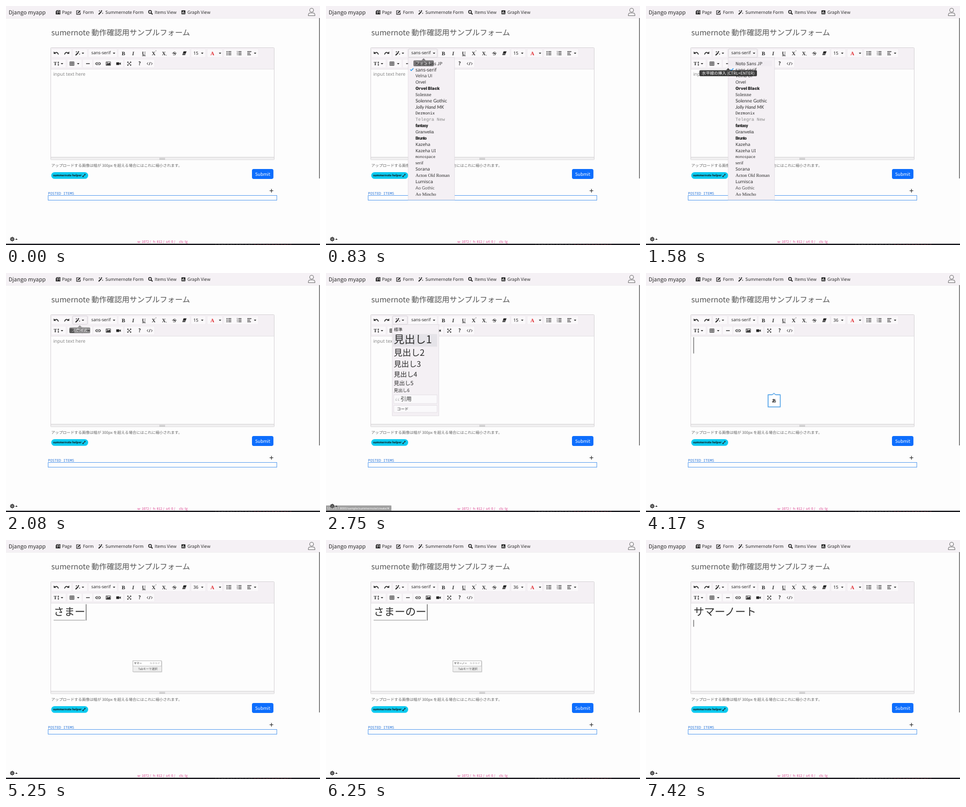
Animation, 600 px wide and 456 px high, one loop 8000 ms. Source, as an HTML page:

```html
<!DOCTYPE html>
<html lang="ja">
<head>
<meta charset="utf-8">
<title>Editor form</title>
<style>
html, body { margin: 0; width: 100%; height: 100%; overflow: hidden; background: #fdfdfd; }
svg { display: block; width: 600px; height: 456px; }
text { font-family: "Noto Sans CJK JP", "Noto Sans CJK", sans-serif; fill: #2b2b2b; white-space: pre; text-rendering: geometricPrecision; }
.ui { font-family: "Noto Sans", sans-serif; }
.i { fill: none; stroke: #222; stroke-width: 1.2; }
</style>
</head>
<body>
<svg viewBox="0 0 600 456"><g id="page"></g><g id="live"></g></svg>
<script>
const LOOP = 8000, EM = 20.15;
const SANS = '"Liberation Sans", sans-serif', SERIF = '"Liberation Serif", serif';
const MONO = '"Noto Sans Mono", monospace', UI = '"Noto Sans", sans-serif';

// Text is placed by its left edge and the middle of its capitals.
const text = (x, cy, size, str, css = '', cls = '') =>
  `<text x="${x}" y="${cy + size * .36}" font-size="${size}" class="${cls}" style='${css}'>${str}</text>`;
const rect = (x, y, w, h, fill, attrs = '') =>
  `<rect x="${x}" y="${y}" width="${w}" height="${h}" fill="${fill}" ${attrs}/>`;
const line = (d, attrs = '') => `<path class="i" d="${d}" ${attrs}/>`;
const fill = (d, color = '#222') => `<path d="${d}" fill="${color}"/>`;
const icon = (x, y, body) => `<g transform="translate(${x} ${y})">${body}</g>`;
const fade = (alpha, body) => alpha ? `<g opacity="${alpha}">${body}</g>` : '';
const drop = (x, y) => fill(`M${x - 2.3} ${y - 1}h4.6l-2.3 2.6z`);

const wand = line('M-4 4L1 -1', 'style="stroke-width:2"') +
  fill('M1.5 -4.6l.6 1.3 1.3 .6-1.3 .6-.6 1.3-.6-1.3-1.3-.6 1.3-.6zM-2.5 -4l.5 1 1 .5-1 .5-.5 1-.5-1-1-.5 1-.5zM3.6 .4l.4 1 1 .4-1 .4-.4 1-.4-1-1-.4 1-.4z');
const rows = [-3, 0, 3];
const bars = widths => rows.map((y, i) => line(`M-4 ${y}h${widths[i]}`)).join('');
const listIcon = mark => rows.map((y, i) => mark(y, i) + line(`M-1.5 ${y}h6`)).join('');
const undo = line('M-2.5 -.5Q2 -3.5 4.2 2.5', 'style="stroke-width:1.5"') + fill('M-4.8 1.2v-4.4l4.4 4.4z');

function navBar() {
  const links = [['Page', 107], ['Form', 147], ['Summernote Form', 189.7], ['Items View', 284], ['Graph View', 346.7]];
  return rect(0, 0, 600, 23, '#f5f1f5') + rect(0, 23, 600, .6, '#e6e2e6') +
    text(5, 12, 10.5, 'Django myapp') +
    links.map(([s, x]) => text(x, 12, 8.35, s)).join('') +
    icon(99.5, 12, line('M-2.5 -3.3h6.3v6.6h-7.6v-5h1.3zM-2.5 -2v5M-1 1h3.6M-1 2.2h3.6') + rect(-1, -2, 3.6, 1.8, '#222')) +
    icon(138.5, 12, line('M1 -3h-4.5v6.8h6.8v-3.6') + line('M-1.2 1.6L3.4 -3', 'style="stroke-width:1.9"')) +
    icon(181, 12, wand) +
    icon(276, 12, '<circle class="i" cx="-.8" cy="-.8" r="2.7" style="stroke-width:1.5"/>' + line('M1.2 1.2L4 4', 'style="stroke-width:1.8"')) +
    icon(339, 12, rect(-3.8, -3.8, 7.6, 7.6, '#222', 'rx="1"') +
      line('M-2 2.3v-2.8M0 2.3v-4.6M2 2.3v-1.5', 'style="stroke:#fff"')) +
    icon(584, 11, '<g fill="none" stroke="#777" stroke-width="1.1"><circle cy="-3" r="3.7"/><path d="M-6.2 7.5v-1.5q0-3.8 3.8-3.8h4.8q3.8 0 3.8 3.8v1.5z"/></g>');
}

function toolbar() {
  const groups = [[86.5, 39], [127.5, 28], [157.5, 55], [214.5, 137], [353.5, 28], [384.5, 29], [416, 66.5]];
  const lower = [[86.5, 28], [117, 28], [146.5, 19], [166.5, 58], [226, 58]];
  const box = y => ([x, w]) => rect(x, y, w, 16, '#faf8fa', 'rx="1.5" stroke="#ece8ed" stroke-width=".6"');
  const glyph = (x, s, css) => text(x, 90, 10, s, `font-family:${SERIF};font-weight:700;${css || ''}`);
  return groups.map(box(82)).join('') + lower.map(box(101.7)).join('') +
    icon(96, 90, undo) + icon(116, 90, `<g transform="scale(-1 1)">${undo}</g>`) +
    icon(137, 90, wand) + drop(147, 90) +
    text(163, 89.5, 8.2, 'sans-serif', '', 'ui') + drop(206.5, 90) +
    glyph(221, 'B') + glyph(241, 'I', 'font-style:italic') + glyph(259.7, 'U') + rect(260, 94.5, 7, .9, '#222') +
    glyph(278.5, 'X') + text(285.8, 87, 5, "'", 'font-weight:700') +
    glyph(298, 'X') + text(305.4, 92.5, 5, ',', 'font-weight:700') +
    glyph(319, 'S') + rect(317.5, 89.6, 8.5, .9, '#222') +
    icon(341, 90, fill('M-1.6 -3.5h5.6l-2.6 7h-5.6z') + line('M-3 1.2h5', 'style="stroke:#faf8fa;stroke-width:.7"')) +
    drop(375, 90) +
    glyph(390.8, 'A', 'fill:#e0262c') + drop(409, 90) +
    icon(426, 90, listIcon(y => rect(-4.5, y - .8, 1.7, 1.7, '#222'))) +
    icon(445.5, 90, listIcon((y, i) => text(-4.5, y, 3.2, i + 1, 'font-weight:700'))) +
    icon(465, 90, bars([8, 5.5, 7])) + drop(476, 90) +
    text(91, 109.7, 9.5, 'T', `font-family:${SERIF};font-weight:700`) +
    icon(100, 110, line('M0 -3v6', 'style="stroke-width:.9"') + fill('M-1.5 -2l1.5 -2 1.5 2zM-1.5 2l1.5 2 1.5 -2z')) + drop(107, 110) +
    icon(126, 110, line('M-4 -3.5h8v7h-8zM-4 -1.2h8M-4 1.1h8M-1.3 -3.5v7M1.4 -3.5v7', 'style="stroke-width:.8"')) + drop(138, 110) +
    rect(153, 109.3, 7, 1.3, '#222') +
    icon(176, 110, line('M-.5 -2h-2a2 2 0 0 0 0 4h2M.5 -2h2a2 2 0 0 1 0 4h-2M-2 0h4')) +
    icon(195.5, 110, line('M-4.3 -3.3h8.6v6.6h-8.6z', 'style="stroke-width:.9"') + fill('M-3.4 2.5v-1.5l2 -2 1.2 1.2 2 -2.3 1.8 2v2.6z') + '<circle cx="-2" cy="-1.6" r=".8"/>') +
    icon(215, 110, rect(-4.3, -2.5, 5.8, 5, '#222', 'rx=".6"') + fill('M1.3 0l3 -2.4v4.8z')) +
    icon(235.5, 110, line('M-3 -3L3 3M3 -3L-3 3', 'style="stroke-width:1"') + fill('M-3.7 -3.7h2.7l-2.7 2.7zM3.7 -3.7v2.7l-2.7 -2.7zM-3.7 3.7v-2.7l2.7 2.7zM3.7 3.7h-2.7l2.7 -2.7z')) +
    text(252.7, 110, 9.5, '?', 'font-weight:700') +
    icon(274.5, 110, line('M-2.8 -2.2l-2.3 2.2 2.3 2.2M2.8 -2.2l2.3 2.2 -2.3 2.2M1 -3l-2 6', 'style="stroke-width:1"'));
}

function page() {
  const specks = Array.from({ length: 26 }, (_, i) =>
    rect(400 + i * 5.7, 454.2 + i % 3 * .4, 2 + i * 7 % 3, .6, i > 12 ? '#7c2f3c' : '#555')).join('');
  const teeth = Array.from({ length: 8 }, (_, i) =>
    `<path d="M-.8 -2.6h1.6v-1.6h-1.6z" transform="rotate(${i * 45})"/>`).join('');
  return rect(0, 0, 600, 456, '#fdfdfd') + navBar() +
    rect(598, 23, 2, 306, '#8d8d8d') +
    text(86.5, 51, 14.56, 'sumernote 動作確認用サンプルフォーム', 'font-weight:300;fill:#555') +
    rect(85.5, 79.5, 427, 214, '#fdfdfd', 'stroke="#d6d3d6" rx="1"') +
    rect(86, 80, 426, 40, '#f4f0f4') + rect(86, 120, 426, .7, '#dcd9dc') +
    rect(86, 288.5, 426, 5, '#f0eff0') + rect(86, 288, 426, .8, '#cfcccf') +
    rect(293, 290, 11, .8, '#aaa') + rect(293, 292, 11, .8, '#aaa') +
    toolbar() +
    text(86.5, 304.5, 7.33, 'アップロードする画像は幅が 300px を超える場合にはこれに縮小されます。', 'fill:#666') +
    rect(86.5, 317, 70.5, 12.8, '#0dcaf0', 'rx="6.4"') +
    text(90, 323.2, 5.6, 'summernote helper', 'font-weight:700;fill:#111') +
    icon(149, 323.3, line('M-2 2L2 -2') + fill('M.2 -2.9h2.7v2.7zM-.2 2.9h-2.7v-2.7z')) +
    rect(470, 311, 41, 19, '#0d6efd', 'rx="3.4"') + text(476, 320.7, 8.5, 'Submit', 'fill:#fff') +
    line('M503.7 352.5h7M507.2 349v7', 'style="stroke-width:1.1"') +
    text(80.3, 357.6, 6.95, 'POSTED ITEMS', 'font-family:"Noto Sans Mono",monospace;fill:#2874d8') +
    rect(80.5, 361.5, 437, 9, '#fdfdfd', 'stroke="#5c9ff0" stroke-width="1"') +
    icon(12, 444.8, teeth + '<circle class="i" r="2.5"/><circle r="1"/>') +
    fill('M17.6 446l2.3 -2.4 2.3 2.4z') +
    [['w: 1072 /', 251], ['h: 812 /', 281], ['srl: 0 /', 305.5], ['cls: lg', 330.5]]
      .map(([s, x]) => text(x, 449.3, 6.3, s, 'fill:#d63384')).join('') +
    rect(0, 453.6, 600, 2.4, '#15151a') + specks;
}

const fonts = [
  ['Noto Sans JP', 8.4], ['sans-serif', 8.9, UI], ['Velna UI', 8.4, '"Open Sans", sans-serif'],
  ['Orvel', 8.3, SANS], ['Orvel Black', 8.1, 'Inter, sans-serif', 900],
  ['Solenne', 8, '"Noto Serif", serif'], ['Solenne Gothic', 9, 'Lato, sans-serif'],
  ['Jolly Hand MK', 9, 'Lato, sans-serif;font-style:italic'], ['Dermonix', 7.7, MONO],
  ['Telegra New', 8.5, '"Liberation Mono", monospace;fill:#888'],
  ['fantasy', 8.4, 'Roboto, sans-serif;letter-spacing:-.7px', 900], ['Granvelia', 8.2, SANS],
  ['Brunto', 8.4, 'Roboto, sans-serif;letter-spacing:-.8px', 900], ['Kazeha', 8.3, UI], ['Kazeha UI', 8.2, UI],
  ['monospace', 7.05, MONO], ['serif', 8.5, SERIF], ['Sorana', 8.4, UI], ['Acton Old Roman', 8.9, SERIF],
  ['Lumisca', 8.2, '"DejaVu Sans", sans-serif'], ['Ao Gothic', 8.3, 'Lato, sans-serif;fill:#555'],
  ['Ao Mincho', 8.6, SERIF]
];
const fontMenu = lit => rect(157, 98.5, 88.7, 271.5, '#f4f0f4', 'stroke="#dcd8dd" stroke-width=".7"') +
  (lit ? rect(158, 104, 83, 11, '#f0ecf1') : '') +
  fonts.map(([s, size, family = '"Noto Sans CJK JP", sans-serif', weight = 400], i) =>
    text(171, 109.6 + 11.86 * i, size, s, `font-weight:${weight};font-family:${family}`)).join('') +
  line('M161 121.3l2 2 4 -4.2', 'style="stroke:#1e96f0;stroke-width:1.4"');

const heads = [[127, 20.5], [152.5, 16.6], [174, 14.6], [193, 12.6], [210, 10.6], [224, 8.5]];
const styleMenu = lit => rect(126.7, 98.5, 89, 173.8, '#f4f0f4', 'stroke="#dcd8dd" stroke-width=".7"') +
  (lit ? rect(128, 116.5, 84.5, 24, '#e5e3e8') : rect(128, 102.5, 84.5, 11, '#e5e3e8')) +
  text(129.7, 108, 8.2, '標準') +
  heads.map(([y, size], i) => text(129.5, y, size, '見出し' + (i + 1))).join('') +
  rect(129.7, 232.5, 82.5, 16.5, '#faf9fb', 'stroke="#dedbe0" stroke-width=".7"') +
  text(131.5, 245, 22, '“', `font-family:${SERIF};fill:#ccc`) + text(142.5, 240.5, 10.6, '引用') +
  rect(129.7, 252.5, 82.5, 13.5, '#faf9fb', 'stroke="#dedbe0" stroke-width=".7"') + text(135.5, 259.3, 7.4, 'コード');

const tip = (cx, y, w, size, str) => fill(`M${cx - 4} ${y}l4 -4 4 4z`, '#2b2b2b') +
  rect(cx - w / 2, y, w, 11.3, '#2b2b2b', 'rx="2"') +
  `<text x="${cx}" y="${y + 5.5 + size * .36}" font-size="${size}" text-anchor="middle" style="fill:#fff">${str}</text>`;

const badgeShape = (color, width) =>
  `<path d="M233.5 232.5h8l3 -2.6 3 2.6h8.8v22.8h-22.8z" fill="#fff" stroke="${color}" stroke-width="${width}"/>`;
const modeBadge = badgeShape('#9ccbf5', 2.4) + badgeShape('#2f8fe0', 1) +
  text(240.3, 244, 8.6, 'あ', 'font-weight:700');

function candidates(words) {
  const longest = Math.max(...words.map(w => w.length));
  const w = words.length > 1 ? 63 : longest > 5 ? 61 : 55, h = words.length * 10.4;
  return rect(243.5, 231.5, w, h + 10.6, '#bbb', 'opacity=".5"') +
    rect(242.3, 230.3, w - .3, h + 10.4, '#fff', 'stroke="#999" stroke-width=".7"') +
    rect(242.7, 230.3 + h, w - 1, 10, '#eee') + rect(242.3, 230 + h, w, .6, '#aaa') +
    words.map((s, i) => text(244.5, 235.5 + 10.4 * i, 5.1, s, 'fill:#111')).join('') +
    (words.length > 1 ? '' : text(w + 219.5, 235.5, 5, 'カタカナ', 'fill:#999')) +
    text(w / 2 + 225, 235.6 + h, 5.6, 'Tabキーで選択', 'fill:#555');
}

// Each track is a list of [start, value] holds.
const tracks = {
  fontTip: [[0, 0], [420, .3], [500, .6], [580, .8], [670, .9], [830, .6], [920, .3], [1000, 0]],
  ruleTip: [[0, 0], [1250, .2], [1330, .5], [1420, .75], [1500, .9], [1750, .6], [1830, .3], [1920, 0]],
  styleTip: [[0, 0], [2080, .5], [2170, .9], [2500, .5], [2580, .2], [2670, 0]],
  menu: [[0, ''], [830, 'font'], [2080, ''], [2500, 'style'], [2830, '']],
  lit: [[0, 0], [1170, 1], [1920, 0], [2670, 1]],
  hover: [[0, 0], [420, 157.5], [2080, 127.5], [2830, 0]],
  status: [[0, 0], [2670, .3], [2750, .55], [2830, .3], [2920, 0]],
  size: [[0, 15], [2830, 36], [7420, 15]],
  caret: [[0, 0], [2830, 1], [3330, 0], [3830, 1], [7420, 2]],
  badge: [[0, 0], [3830, .2], [3920, .4], [4000, .65], [4080, .85], [4170, 1], [4330, 0]],
  typed: [[0, ''], [4330, 'ｓ'], [4500, 'さｍ'], [4830, 'さま'], [5250, 'さまー'], [5750, 'さまーｎ'], [5920, 'さまーの'],
    [6250, 'さまーのー'], [6420, 'さまーのーｔ'], [6500, 'さまーのーと'], [6590, 'サマーノート']],
  words: [[0, ''], [4330, 'ｓ'], [4500, 'サｍ'], [4830, 'サマ'], [5250, 'サマー'], [5330, 'サマー,サマータイム,サマーセール'],
    [5750, 'サマーｎ'], [5920, 'サマーノ'], [6250, 'サマーノー'], [6420, 'サマーノーｔ'], [6500, 'サマーノート'], [6670, '']],
  underline: [[0, 0], [4330, 1], [6830, 0]]
};
const at = (track, t) => track.filter(([start]) => start <= t).pop()[1];

function scene(t) {
  const s = {};
  for (const key in tracks) s[key] = at(tracks[key], t);
  const end = 91 + EM * s.typed.length;
  const hoverWidth = s.hover > 150 ? 55 : 28;
  return (s.hover ? rect(s.hover, 82, hoverWidth, 16, '#201028', 'fill-opacity=".02" stroke="#cfcad0" stroke-width=".7" rx="1.5"') : '') +
    text(358, 89.5, 8.5, s.size, '', 'ui') +
    (t < 2830 ? text(90.3, 129.3, 8.9, 'input text here', 'fill:#888', 'ui') : '') +
    (s.typed ? text(91, 137.2, EM, s.typed) : '') +
    (s.underline ? rect(91, 152.6, end - 91, .8, '#777') : '') +
    (s.caret === 1 ? rect(s.typed ? end + 1.2 : 90.6, 122.5, .9, 31, '#222') : '') +
    (s.caret === 2 ? rect(90.6, 152.5, .9, 13, '#222') : '') +
    fade(s.badge, modeBadge) + (s.words ? candidates(s.words.split(',')) : '') +
    (s.menu === 'font' ? fontMenu(s.lit) : '') + (s.menu === 'style' ? styleMenu(s.lit) : '') +
    fade(s.fontTip, tip(186.5, 103.8, 39, 7.8, 'フォント')) +
    fade(s.ruleTip, tip(157, 122.6, 110, 7.75, '水平線の挿入 (CTRL+ENTER)')) +
    fade(s.styleTip, tip(141, 103.8, 40, 7.8, 'スタイル')) +
    fade(s.status, rect(0, 443.5, 125, 10.4, '#555', 'rx="1"') +
      text(1.5, 448.8, 5.6, '127.0.0.1:8000/sample/summernote/create/#', 'fill:#fff', 'ui'));
}

const live = document.getElementById('live');
document.getElementById('page').innerHTML = page();
let shown;
function tick() {
  const next = scene(performance.now() % LOOP);
  if (next !== shown) live.innerHTML = shown = next;
  requestAnimationFrame(tick);
}
tick();
</script>
</body>
</html>
```
